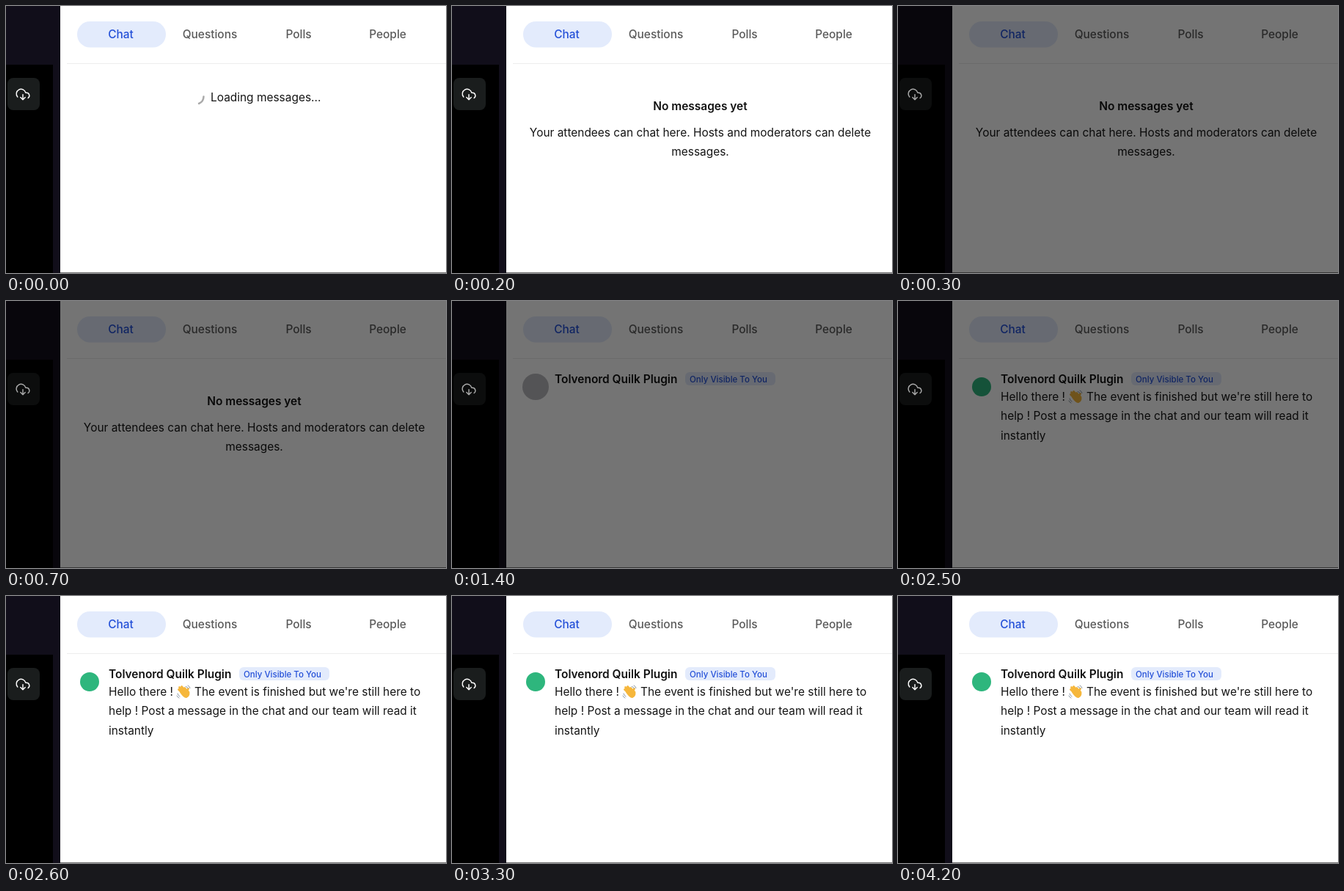
Write an HTML page that moves like this. It is 600 px wide and 364 px high and loops after 8000 ms.

```html
<!DOCTYPE html>
<html lang="en">
<head>
<meta charset="utf-8">
<title>Event chat panel</title>
<style>
  html, body { margin: 0; width: 100%; height: 100%; overflow: hidden; background: #fff; }
  svg { display: block; width: 100vw; height: 100vh; font-family: Inter, "Liberation Sans", sans-serif; font-size: 15.45px; }
  .tab { font-weight: 500; fill: #5a5a5a; text-anchor: middle; }
  .bold { font-weight: 600; fill: #111; }
  .body { fill: #151515; }
  .mid { text-anchor: middle; }
  .accent { font-weight: 500; fill: #2450d8; }
  .line { fill: none; stroke-linecap: round; stroke-linejoin: round; }
</style>
</head>
<body>
<svg viewBox="0 0 600 364">
  <rect width="600" height="364" fill="#fff"/>
  <rect width="74" height="364" fill="#110e1a"/>
  <rect y="80" width="64" height="284" fill="#000"/>
  <rect x="2" y="98" width="44" height="44" rx="8" fill="#1a1d1d"/>
  <rect x="97" y="21" width="121" height="35.500" rx="17.500" fill="#e3ebfc"/>
  <text class="accent mid" x="156.500" y="44">Chat</text>
  <text class="tab" x="278" y="44">Questions</text>
  <text class="tab" x="399" y="44">Polls</text>
  <text class="tab" x="520.500" y="44">People</text>
  <path d="M83 78.500H600" stroke="#ededed"/>
  <path d="M74 363.500H600" stroke="#777"/>

  <g id="loading">
    <path id="spinner" class="line" d="M269.500 123.500A10.500 10.500 0 0 1 263 133" stroke="#aaa" stroke-width="2.500"/>
    <text class="body" x="279" y="129.500">Loading messages...</text>
  </g>

  <g id="empty">
    <text class="bold mid" x="338.500" y="142">No messages yet</text>
    <text class="body mid" x="338.500" y="177.500">Your attendees can chat here. Hosts and moderators can delete</text>
    <text class="body mid" x="338.500" y="203.500">messages.</text>
  </g>

  <g id="header">
    <circle id="blank" cx="114" cy="117" r="18" fill="#b9b9bd"/>
    <text class="bold" x="140" y="111.500">Tolvenord Quilk Plugin</text>
    <rect x="318" y="97" width="123" height="18" rx="6" fill="#e3ebfc"/>
    <text class="accent" x="324" y="110.500" font-size="11.500">Only Visible To You</text>
  </g>

  <g id="message">
    <circle cx="114" cy="117" r="13" fill="#2eb67d"/>
    <g class="body">
      <text x="140" y="136">Hello there !</text>
      <text x="257" y="136">The event is finished but we're still here to</text>
      <text x="140" y="162">help ! Post a message in the chat and our team will read it</text>
      <text x="140" y="188.500">instantly</text>
    </g>
    <g class="line" stroke="#f6b73c" stroke-width="2.800">
      <path d="M240 132L235.500 127.500M241.500 130L236.500 124.500M244 129L239.500 123.500M246.500 129L243.500 125.500M247.500 132Q247 128 248.500 126.500"/>
      <path d="M238.500 131L245 127.500L249 131Q249.500 136 246 137.500Q243 138 238.500 131Z" fill="#f6b73c"/>
      <path d="M245 123.500Q248 124 248.500 126M248 122Q250.500 123 251 125.500M234 133Q234.500 136 237 137M233 136Q234 138.500 236 139" stroke="#8d99a5" stroke-width="1"/>
    </g>
  </g>

  <rect id="shade" width="600" height="364" fill="#000" opacity=".545"/>

  <g id="cloud" class="line" stroke="#fff" stroke-width="1.800" transform="translate(13.400 111) scale(.8)">
    <path d="M20.900 18.100A5 5 0 0 0 18 9H16.700A8 8 0 1 0 3 16.300"/>
    <path d="M12 12V21M8 17L12 21L16 17"/>
  </g>
</svg>
<script>
  const LOOP = 8000;
  const EMPTY_AT = 200, DIM_AT = 300, HEADER_AT = 1300, MESSAGE_AT = 1500, BRIGHT_AT = 2600;
  const el = id => document.getElementById(id);
  const show = (id, on) => el(id).setAttribute("visibility", on ? "visible" : "hidden");

  function draw(t) {
    const dim = t >= DIM_AT && t < BRIGHT_AT;
    show("loading", t < EMPTY_AT);
    show("empty", t >= EMPTY_AT && t < HEADER_AT);
    show("header", t >= HEADER_AT);
    show("blank", t >= HEADER_AT && t < MESSAGE_AT);
    show("message", t >= MESSAGE_AT);
    show("shade", dim);
    el("cloud").setAttribute("opacity", dim ? .65 : 1);
    const turn = Math.floor(t / 100) * 45;
    el("spinner").setAttribute("transform", `rotate(${turn} 259 123.500)`);
  }

  const start = performance.now();
  function tick() {
    draw((performance.now() - start) % LOOP);
    requestAnimationFrame(tick);
  }
  draw(0);
  requestAnimationFrame(tick);
</script>
</body>
</html>
```
